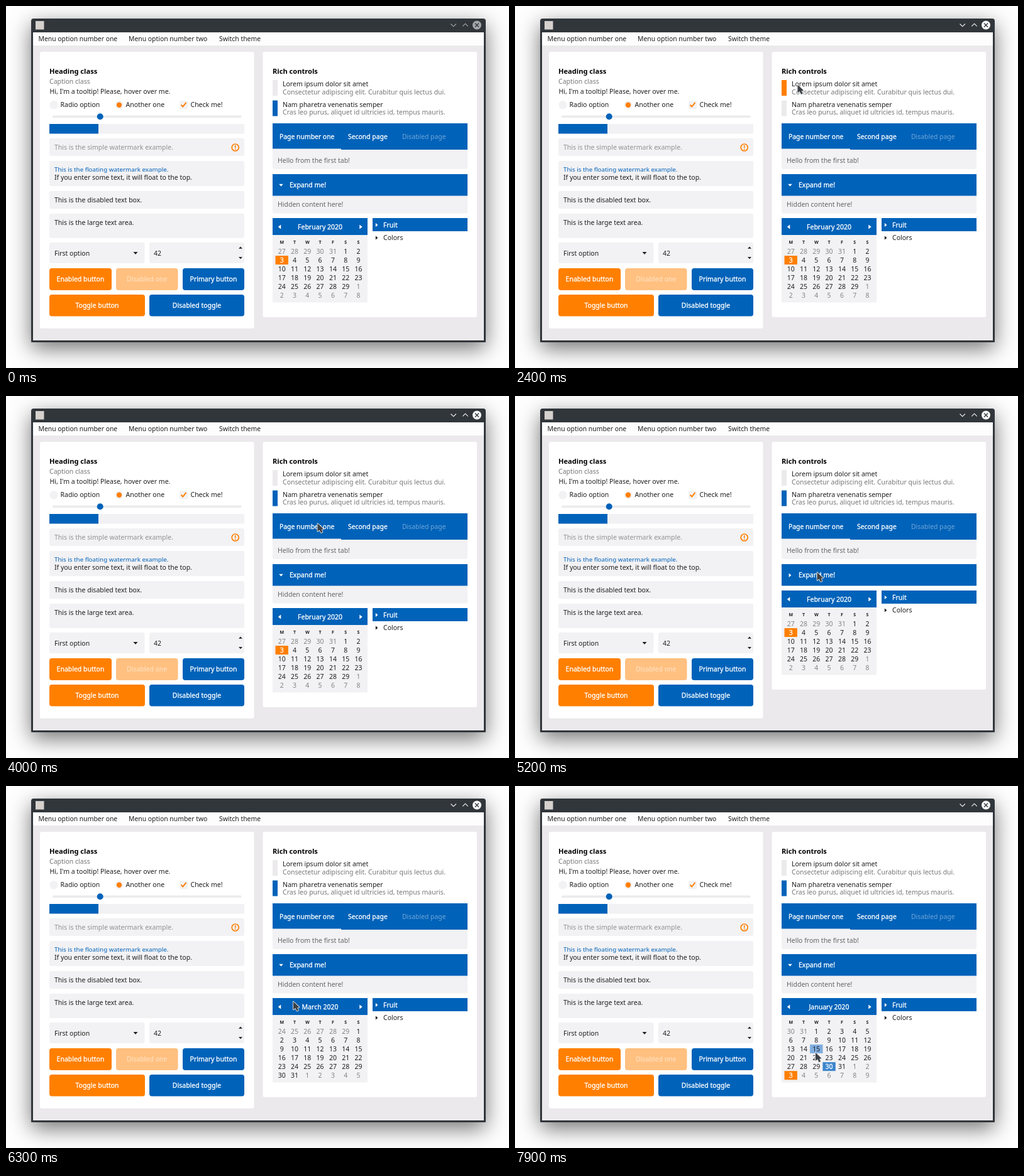
These frames come from a looping animation (800x577 px, 8000 ms). An HTML page with a canvas:

```html
<!DOCTYPE html>
<html lang="en">
<head>
<meta charset="utf-8">
<title>Widget theme demo</title>
<style>
html, body { margin: 0; width: 100%; height: 100%; overflow: hidden; background: #fefefe; }
canvas { display: block; width: 800px; height: 577px; }
</style>
</head>
<body>
<canvas id="stage"></canvas>
<script>
const LOOP = 8000, STEP = 100;
const BLUE = '#0062b9', ORANGE = '#ff7f00', PALE = '#f2f1f3', INK = '#1f1f1f',
  GREY = '#777', DARK = '#31363b', WHITE = '#fff';

const canvas = document.getElementById('stage');
const dpr = window.devicePixelRatio || 1;
canvas.width = 800 * dpr;
canvas.height = 577 * dpr;
const ctx = canvas.getContext('2d');
ctx.scale(dpr, dpr);
ctx.lineJoin = 'round';

// Pointer path: time, x, y
const path = [
  [100, 105, 1], [600, 100, 50], [900, 150, 52], [1200, 339.5, 58.5], [1500, 378, 54],
  [1700, 378, 54], [2200, 449.5, 125.5], [2500, 449.5, 125.5], [2750, 450, 160],
  [3000, 450, 160], [3400, 575, 206], [3500, 575, 206], [3900, 495.5, 203],
  [4100, 495.5, 203], [4600, 480.5, 281], [5500, 480.5, 281], [5900, 564, 350],
  [6050, 564, 350], [6300, 457, 343.5], [6450, 435, 350], [7000, 435, 350],
  [7450, 499, 446], [7700, 499, 446], [7900, 478, 425]
];

const within = (t, from, to) => t >= from && t < to;

function pointerAt(t) {
  if (t < path[0][0]) return { x: -99, y: -99 };
  const i = path.findIndex(p => p[0] > t);
  if (i < 0) {
    const end = path[path.length - 1];
    return { x: end[1], y: end[2] };
  }
  const [t0, x0, y0] = path[i - 1], [t1, x1, y1] = path[i];
  const u = (t - t0) / (t1 - t0), e = u * u * (3 - 2 * u);
  return { x: x0 + (x1 - x0) * e, y: y0 + (y1 - y0) * e };
}

function box(x0, y0, x1, y1, color, r = 0) {
  ctx.fillStyle = color;
  ctx.beginPath();
  ctx.roundRect(x0, y0, x1 - x0, y1 - y0, r);
  ctx.fill();
}

function dot(x, y, r, color) {
  ctx.fillStyle = color;
  ctx.beginPath();
  ctx.arc(x, y, r, 0, 7);
  ctx.fill();
}

function line(points, color, width) {
  ctx.strokeStyle = color;
  ctx.lineWidth = width;
  ctx.beginPath();
  points.forEach(([x, y]) => ctx.lineTo(x, y));
  ctx.stroke();
}

// turn counts quarter turns clockwise from pointing down
function tri(x, y, turn, color, w = 7, h = 4) {
  ctx.save();
  ctx.translate(x, y);
  ctx.rotate(turn * Math.PI / 2);
  ctx.fillStyle = color;
  ctx.beginPath();
  ctx.moveTo(-w / 2, -h / 2);
  ctx.lineTo(w / 2, -h / 2);
  ctx.lineTo(0, h / 2);
  ctx.fill();
  ctx.restore();
}

function text(s, x, y, { color = INK, size = 10.5, weight = 400, align = 'left', medium = false } = {}) {
  ctx.font = `${weight} ${size}px "Noto Sans", "Open Sans", sans-serif`;
  ctx.textAlign = align;
  ctx.fillStyle = color;
  ctx.fillText(s, x, y);
  if (medium) {
    ctx.strokeStyle = color;
    ctx.lineWidth = 0.3;
    ctx.strokeText(s, x, y);
  }
}

function button(label, x0, y0, x1, y1, color, ink = WHITE) {
  box(x0, y0, x1, y1, color, 4);
  text(label, (x0 + x1) / 2, (y0 + y1) / 2 + 3.8, { color: ink, align: 'center', medium: true });
}

function drawWindow(active) {
  ctx.save();
  ctx.shadowColor = 'rgba(0,0,0,.55)';
  ctx.shadowBlur = 34 * dpr;
  ctx.shadowOffsetY = 10 * dpr;
  box(40, 20, 763, 536, DARK, [4, 4, 1, 1]);
  ctx.restore();
  box(43, 42, 760, 63, '#fdfdfd');
  box(43, 63, 760, 533, '#ebe9eb');
  box(47, 24, 60.5, 37.5, '#d6d1cd');
  const tone = active ? '#f4f5f5' : '#a3a7aa';
  line([[707.5, 28.5], [711.7, 32.7], [715.9, 28.5]], tone, 1.1);
  line([[726.3, 32.3], [730.5, 28.1], [734.7, 32.3]], tone, 1.1);
  dot(749, 30.5, 7, tone);
  line([[746, 27.5], [752, 33.5]], DARK, 1.2);
  line([[746, 33.5], [752, 27.5]], DARK, 1.2);
}

function drawMenu(p) {
  const items = [
    ['Menu option number one', 43, 186, 51.5],
    ['Menu option number two', 186, 330.5, 195],
    ['Switch theme', 330.5, 416, 339]
  ];
  for (const [label, x0, x1, x] of items) {
    const over = p.x >= x0 && p.x < x1 && p.y >= 42 && p.y < 63;
    if (over) box(x0, 42, x1, 63, '#00428c');
    text(label, x, 56, { color: over ? WHITE : INK, size: 10.4, medium: over });
  }
}

function drawForm() {
  box(54, 73, 394.5, 514, WHITE, 3);
  text('Heading class', 69, 107.5, { size: 11.1, weight: 700, color: '#000' });
  text('Caption class', 69, 124, { color: GREY });
  text("Hi, I'm a tooltip! Please, hover over me.", 69.5, 140.3);

  dot(76, 157.7, 6.7, PALE);
  text('Radio option', 86.5, 161.3);
  dot(180, 157.7, 6.7, PALE);
  dot(180, 157.7, 4.2, ORANGE);
  text('Another one', 190.5, 161.3);
  box(276, 151, 289.5, 164.5, PALE, 2);
  line([[278.5, 157.5], [281.3, 160.5], [286.5, 153.8]], ORANGE, 2);
  text('Check me!', 293.5, 161.3);

  box(74, 174.5, 374.5, 178, '#eceaec', 1.5);
  dot(149.7, 176.2, 5, BLUE);
  box(69, 188, 379, 203.5, PALE);
  box(69, 188, 147, 203.5, BLUE);

  box(69, 211, 379, 239, PALE, 3);
  text('This is the simple watermark example.', 77, 229.3, { color: '#929292' });
  ctx.strokeStyle = ORANGE;
  ctx.lineWidth = 1.7;
  ctx.beginPath();
  ctx.arc(364.7, 225.5, 5.5, 0, 7);
  ctx.stroke();
  line([[364.7, 222], [364.7, 226.3]], ORANGE, 1.6);
  line([[364.7, 227.4], [364.7, 229]], ORANGE, 1.6);

  box(69, 247, 379, 287, PALE, 3);
  text('This is the floating watermark example.', 77, 264, { color: BLUE, size: 9.8 });
  text('If you enter some text, it will float to the top.', 77, 277);
  box(69, 295, 379, 323, PALE, 3);
  text('This is the disabled text box.', 77, 312.8);
  box(69, 331, 379, 370, PALE, 3);
  text('This is the large text area.', 77, 348.8);

  box(69, 377, 220.5, 410, PALE, 3);
  text('First option', 77, 397.6);
  tri(206, 394, 0, INK);
  box(228, 377, 379, 410, PALE, 3);
  text('42', 235, 397.6);
  tri(373, 385.2, 2, INK, 6, 3.3);
  tri(373, 401.7, 0, INK, 6, 3.3);

  button('Enabled button', 69, 418, 168, 453, ORANGE);
  button('Disabled one', 175, 418, 273.5, 453, '#ffc080', '#ffdcb8');
  button('Primary button', 281, 418, 379, 453, BLUE);
  button('Toggle button', 69, 460, 221, 494.5, ORANGE);
  button('Disabled toggle', 228, 460, 379, 494.5, BLUE);
}

function drawList(t, p) {
  const rows = [
    ['Lorem ipsum dolor sit amet', 'Consectetur adipiscing elit. Curabitur quis lectus dui.', 118],
    ['Nam pharetra venenatis semper', 'Cras leo purus, aliquet id ultricies id, tempus mauris.', 150.5]
  ];
  const chosen = within(t, 2300, 2800) ? 0 : 1;
  rows.forEach(([title, note, y], i) => {
    const over = p.x >= 424 && p.x < 734 && p.y >= y && p.y < y + 25;
    box(424, y, 432, y + 25, i !== chosen ? '#eceaec' : over ? ORANGE : BLUE);
    text(title, 440, y + 10.2);
    text(note, 440, y + 22.5, { color: GREY });
  });
}

function drawTabs(t) {
  const second = within(t, 3500, 4000);
  box(424, 187, 734, 260, PALE, [0, 0, 3, 3]);
  box(424, 187, 734, 229, BLUE);
  if (second) box(533, 227.5, 619, 229, PALE);
  else box(424, 227.5, 533, 229, PALE);
  text('Page number one', 435, 211.5, { color: WHITE, size: 10.4, medium: true });
  text('Second page', 544, 211.5, { color: WHITE, size: 10.4, medium: true });
  text('Disabled page', 630, 211.5, { color: '#6fa6d8', size: 10.4 });
  text(`Hello from the ${second ? 'second' : 'first'} tab!`, 432, 250, { color: '#666' });
}

function drawExpander(open) {
  if (open) {
    box(424, 302, 734, 330.5, PALE, [0, 0, 3, 3]);
    text('Hidden content here!', 432, 320.3, { color: '#666' });
  }
  box(424, 268, 734, 302.5, BLUE);
  tri(437.5, 285.7, open ? 0 : 3, WHITE, 6.5, 3.8);
  text('Expand me!', 451, 289.3, { color: WHITE, medium: true });
}

function drawCalendar(t, p) {
  const month = within(t, 6000, 6600) ? 2 : t >= 6900 ? 0 : 1;
  const title = ['January', 'February', 'March'][month] + ' 2020';
  box(424, 338, 575, 472.5, PALE);
  box(424, 338, 575, 365, BLUE);
  tri(435, 352, 1, WHITE, 7, 4.5);
  tri(564.5, 352, 3, WHITE, 7, 4.5);
  text(title, 499.5, 356, { color: WHITE, align: 'center', medium: true });

  const lead = (new Date(Date.UTC(2020, month, 1)).getUTCDay() + 6) % 7;
  for (let i = 0; i < 42; i++) {
    const col = i % 7, row = Math.floor(i / 7);
    const x = 438.7 + col * 20.3, y = 391 + row * 14.05;
    if (row === 0) text('MTWTFSS'[col], x, 378.7, { size: 7, weight: 700, align: 'center' });
    const date = new Date(Date.UTC(2020, month, 1 + i - lead));
    const m = date.getUTCMonth(), day = date.getUTCDate();
    const today = m === 1 && day === 3;
    const picked = t >= 7600 && m === 0 && day === 30;
    const over = Math.abs(p.x - x) < 10.15 && Math.abs(p.y - y) < 7;
    const fill = today ? ORANGE : picked ? '#3b85cd' : over ? '#7fade0' : null;
    if (fill) box(x - 10.2, y - 7, x + 10.2, y + 7, fill);
    const color = today || picked ? WHITE : m === month ? INK : '#858585';
    text(day, x, y + 3.8, { color, align: 'center', medium: today || picked });
  }
}

function drawTree() {
  box(583, 338, 734, 359, BLUE);
  tri(589.7, 349, 3, WHITE, 6, 3.6);
  text('Fruit', 600, 352.6, { color: WHITE, medium: true });
  tri(589.7, 369.5, 3, INK, 6, 3.6);
  text('Colors', 600, 373);
}

function drawRich(t, p) {
  const open = !within(t, 4700, 5500);
  const lift = open ? 0 : 28;
  box(408.5, 73, 749, 496 - lift, WHITE, 3);
  text('Rich controls', 424, 107.5, { size: 11.1, weight: 700, color: '#000' });
  drawList(t, p);
  drawTabs(t);
  drawExpander(open);
  ctx.save();
  ctx.translate(0, -lift);
  drawCalendar(t, { x: p.x, y: p.y + lift });
  drawTree();
  ctx.restore();
}

function drawPointer({ x, y }) {
  ctx.save();
  ctx.translate(x, y);
  ctx.beginPath();
  [[0, 0], [0, 13], [3.2, 10.6], [5.6, 15.2], [8, 14], [6.2, 9.7], [9.6, 9.2]]
    .forEach(([px, py]) => ctx.lineTo(px, py));
  ctx.closePath();
  ctx.strokeStyle = '#eeeeef';
  ctx.lineWidth = 1.6;
  ctx.stroke();
  ctx.fillStyle = '#3d4146';
  ctx.fill();
  ctx.restore();
}

function draw(now) {
  const t = Math.floor((now % LOOP) / STEP) * STEP;
  const p = pointerAt(t);
  ctx.fillStyle = '#fefefe';
  ctx.fillRect(0, 0, 800, 577);
  drawWindow(t >= 2300);
  drawMenu(pointerAt(t - 80));
  drawForm();
  drawRich(t, p);
  drawPointer(p);
}

let start = null;
function tick(now) {
  if (start === null) start = now;
  draw(Math.max(0, now - start));
  requestAnimationFrame(tick);
}
draw(0);
requestAnimationFrame(tick);
</script>
</body>
</html>
```
